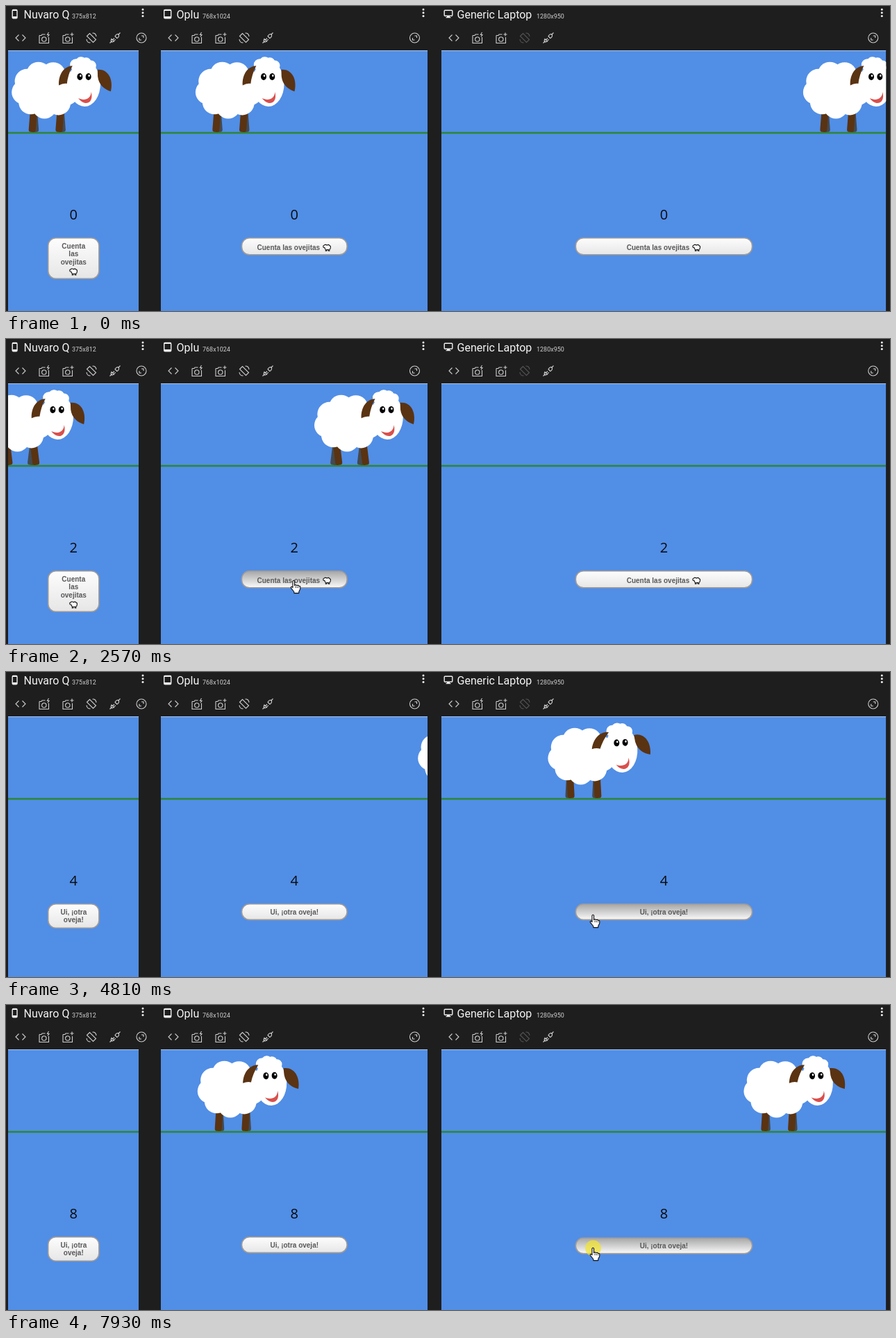
These frames come from a looping animation (1273x440 px, 8000 ms). An HTML page with a canvas:

```html
<!DOCTYPE html>
<html lang="es">
<head>
<meta charset="utf-8">
<title>Cuenta las ovejitas</title>
<style>
html, body { margin: 0; width: 100%; height: 100%; overflow: hidden; background: #1e1e1e; }
canvas { display: block; width: 1273px; height: 440px; }
</style>
</head>
<body>
<canvas id="stage"></canvas>
<script>
const W = 1273, H = 440, LOOP = 8000, TAU = Math.PI * 2;
const canvas = document.getElementById('stage');
const dpr = window.devicePixelRatio || 1;
canvas.width = W * dpr;
canvas.height = H * dpr;
const c = canvas.getContext('2d');

// speed in px/s; each walk lasts period ms and has run for lead ms at the start
const panels = [
  { x: 3, w: 188, name: 'Nuvaro Q', size: '375x812', sizeX: 95, icon: 'phone', narrow: true,
    speed: 103.5, period: 2947, lead: 515 },
  { x: 223, w: 384, name: 'Oplu', size: '768x1024', sizeX: 283, icon: 'tablet',
    speed: 66.6, period: 7886, lead: 1471 },
  { x: 627, w: 640.3, name: 'Generic Laptop', size: '1280x950', sizeX: 764, icon: 'screen', locked: true,
    speed: 90.4, period: 8875, lead: 6294 }
];
const ENTRY = -48, STEPS = 1.764;

const HOLD = 160;
const clicks = [1800, 2330, 3880, 4470, 5190, 5820, 6730, 7540, 7840];

function ease(t, from, to) {
  const u = Math.min(1, Math.max(0, (t - from) / (to - from)));
  return u * u * (3 - 2 * u);
}

function pointerAt(t) {
  const enter = ease(t, 300, 1500), cross = ease(t, 2630, 3720);
  return [470 - 56 * enter + 431 * cross, 442 - 94 * enter + 2 * cross + 3 * Math.sin(Math.PI * cross)];
}

function disc(x, y, rx, ry = rx) {
  c.beginPath();
  c.ellipse(x, y, rx, ry, 0, 0, TAU);
  c.fill();
}

function box(x, y, w, h, r) {
  c.beginPath();
  c.roundRect(x, y, w, h, r);
}

function text(str, x, y, font, color, align = 'left') {
  c.font = font;
  c.fillStyle = color;
  c.textAlign = align;
  c.fillText(str, x, y);
}

function path(d, fill, stroke, width = 1) {
  const p = new Path2D(d);
  if (fill) { c.fillStyle = fill; c.fill(p); }
  if (stroke) { c.strokeStyle = stroke; c.lineWidth = width; c.stroke(p); }
}

function at(x, y, draw, turn = 0) {
  c.save();
  c.translate(x, y);
  c.rotate(turn);
  draw();
  c.restore();
}

function legs(swing, color) {
  for (const x of [31.5, 70.2]) {
    at(x, 150, () => {
      c.fillStyle = color;
      box(-5, 0, 10, 32, [0, 0, 3.5, 3.5]);
      c.fill();
    }, -swing / 32);
  }
}

function head(tilt) {
  c.fillStyle = '#fff';
  disc(0, 27, 23, 33);
  for (let i = 0; i < 4; i++) disc(-12 + 7.3 * i, 1 - 5 * Math.sin((i + .3) * .95), 8.5 - .4 * i);
  for (const x of [-6.5, 5.8]) {
    c.fillStyle = '#000';
    disc(x, 17, 4, 5);
    c.fillStyle = '#fff';
    disc(x + 1, 15.5, 1.3, 1.6);
  }
  path('M-9 48C0 61 14 55 9.5 39C9 50 -1 52 -9 48Z', '#d9504c');
  at(-17, 1, () => path('M0 0C-12 1 -20 13 -18.5 29Q-13 25.5 -7 26Q-6 13 0 0Z', '#5a3312'), tilt * .3);
  at(19, 7, () => path('M0 0C14 -1 23 13 18 32C9 29 1 22 0 10Z', '#5a3312'), -tilt * .15);
}

function sheep(x, t) {
  const swing = 7.8 * Math.cos((t / 1000 * STEPS + .3) * TAU);
  const tilt = Math.sin(Math.PI * (t - 1200) / 9200) ** 2;
  at(x, 0, () => {
    legs(-swing, '#444a50');
    legs(swing, '#5a3312');
    c.fillStyle = '#fff';
    disc(48, 121, 38, 32);
    for (let i = 0; i < 9; i++) {
      const a = 3 + i * TAU / 9;
      disc(48 + 31 * Math.cos(a), 121 + 24 * Math.sin(a), 17.5);
    }
    at(104.3, 85, () => head(tilt), -.06 * tilt);
  });
}

function deviceIcon(kind, x) {
  c.strokeStyle = c.fillStyle = '#f0f0f0';
  c.lineWidth = 1.4;
  if (kind === 'screen') {
    box(x + 4.2, 6.2, 11.6, 8, 1); c.stroke();
    c.fillRect(x + 8, 14.5, 4, 1.6);
    c.fillRect(x + 6.5, 16, 7, 1.2);
    return;
  }
  const [dx, w] = kind === 'phone' ? [6.2, 6.8] : [4.7, 10];
  box(x + dx, 5.5, w, 12.3, 1.4); c.stroke();
  c.fillRect(x + dx, 5, w, 2);
  c.fillRect(x + dx, 15, w, 3);
}

const camera = 'M-7 -3.5H-4L-3 -5H1.5M6.5 -1V7.5H-7V-3.5M3 2A3.2 3.2 0 1 1 -3.4 2A3.2 3.2 0 1 1 3 2';
const icons = [
  'M-2.5 -4.5L-7 0L-2.5 4.5M2.5 -4.5L7 0L2.5 4.5',
  camera + 'M6.5 -8L4.5 -4.5H7L5 -1.5',
  camera + 'M6 -7.5V-2.5M3.5 -5H8.5',
  'M-6.5 -2.5L-2.5 -6.5L6.5 2.5L2.5 6.5ZM1.5 -7Q6.5 -7 7 -2M-1.5 7Q-6.5 7 -7 2',
  'M-7.5 7.5L-4.5 4.5M4.5 -4.5L7.5 -7.5M-5 1.5L-1.5 5L-4 6Q-7 5 -5 1.5ZM0 -2.5L2.8 .5Q6 -1 5.5 -4.5Q3 -7 0 -2.5ZM-3.5 3L-1 .5M-1.8 4.8L.8 2'
];
const ring = 'M7 0A7 7 0 1 1 -7 0A7 7 0 1 1 7 0M0 -3H3V0M0 3H-3V0';

function header(p) {
  const ink = '#cfcfcf', right = p.x + p.w;
  deviceIcon(p.icon, p.x);
  text(p.name, p.x + 22.5, 18, '16px Roboto, sans-serif', '#f4f4f4');
  text(p.size, p.sizeX, 17.7, '9px Roboto, sans-serif', '#d0d0d0');
  c.fillStyle = '#f0f0f0';
  const menu = p.narrow ? right + 6 : right - 6;
  for (let i = 0; i < 3; i++) disc(menu, 5 + i * 4.8, 1.5);
  icons.forEach((d, i) => {
    at(p.x + 18 + i * 34, 46, () => path(d, null, p.locked && i === 3 ? '#555' : ink, 1.1));
  });
  at(Math.max(right - 18.5, p.x + 192), 46, () => path(ring, null, ink, 1.1));
}

function miniSheep(x, y) {
  at(x, y, () => path('M-5.5 -2.5L-3 -4.2Q-1 -4.5 0 -3.5Q2 -5 3.5 -3.2Q5.7 -2.5 5 0Q5.2 2 3.5 2.5V4.7H2V3H-.5V4.7H-2V2.5Q-3.5 1.5 -3.3 0L-5.3 -.5Z',
    '#fff', '#111', 1.1));
}

function button(p, mid, asked, hover, down) {
  const w = p.w * .4 - 2;
  const h = p.narrow ? (asked ? 58.5 : 34.4) : (asked ? 24 : 22.6);
  const y = 334.8 + (down ? 1.2 : 0);
  const grad = c.createLinearGradient(0, y, 0, y + h);
  grad.addColorStop(0, hover ? '#a6a6a6' : '#fdfdfd');
  grad.addColorStop(1, hover ? '#fbfbfb' : '#e6e6e6');
  box(mid - w / 2, y, w, h, 11);
  c.fillStyle = grad;
  c.fill();
  c.strokeStyle = '#a09b97';
  c.lineWidth = 1.6;
  c.stroke();

  const label = (s, x, ly) => text(s, x, ly, 'bold 10px "Liberation Sans", Arial, sans-serif', '#585858', 'center');
  if (p.narrow) {
    const lines = asked ? ['Cuenta', 'las', 'ovejitas'] : ['Ui, ¡otra', 'oveja!'];
    lines.forEach((s, i) => label(s, mid, y + 15 + i * 11.6));
    if (asked) miniSheep(mid, 383.3);
  } else if (asked) {
    label('Cuenta las ovejitas', mid - 8.5, y + 16.8);
    miniSheep(mid + 47, y + 13.8);
  } else {
    label('Ui, ¡otra oveja!', mid, y + 15);
  }
}

function panel(p, t, count, [px, py], down) {
  const mid = p.x + p.w / 2 + .3;
  header(p);

  c.save();
  c.beginPath();
  c.rect(p.x, 64, p.w, H - 64);
  c.clip();
  c.fillStyle = '#518ee6';
  c.fillRect(p.x, 64, p.w, H);
  c.fillStyle = '#2e8639';
  c.fillRect(p.x, 181.7, p.w, 2.6);
  sheep(p.x + ENTRY + p.speed * ((t + p.lead) % p.period) / 1000, t);
  c.fillStyle = '#a9c6f0';
  c.fillRect(p.x, 64, p.w, 1);
  c.restore();

  text(count, mid, 308, '20px "Open Sans", "Noto Sans", sans-serif', '#0a0a0a', 'center');
  const hover = Math.abs(px - mid) < p.w * .2 - 1 && py > 334 && py < 360;
  button(p, mid, count < 3, hover, hover && down);
  return hover;
}

function drawCursor([x, y], hand, glow) {
  if (glow) {
    c.fillStyle = 'rgba(242, 228, 48, .74)';
    disc(x + .5, y + .8, 11.5);
  }
  c.lineJoin = 'round';
  at(x, y, () => {
    if (hand) {
      c.scale(1.04, 1.06);
      path('M-1 1.5Q0 -.8 1.5 1.2V7L3 6.2L4.5 7.2L6.3 6.8L7.6 8L9 8Q9.8 9 9.3 12L7.5 15.5V17.5H.8V15.8L-3.5 10.5Q-3.8 8.5 -2 9L-1 10Z', '#fff', '#111', 1.1);
      path('M3 8V10.5M5.2 8.5V10.5M7.3 9V10.5', null, '#111', .8);
    } else {
      path('M0 0V13.5L3.1 10.7L5.2 15.6L7.5 14.6L5.4 9.8H9.6Z', '#fff', '#111', 1);
    }
  });
  c.lineJoin = 'miter';
}

function draw(t) {
  const count = clicks.filter(k => t >= k + HOLD).length;
  const down = clicks.some(k => t >= k && t < k + HOLD);
  const glow = clicks.some(k => t >= k + 60 && t < k + HOLD);
  const cursor = pointerAt(t);
  c.setTransform(dpr, 0, 0, dpr, 0, 0);
  c.fillStyle = '#1e1e1e';
  c.fillRect(0, 0, W, H);
  const hand = panels.map(p => panel(p, t, count, cursor, down)).includes(true);
  drawCursor(cursor, hand, glow);
}

const start = performance.now();
function tick() {
  draw((performance.now() - start) % LOOP);
  requestAnimationFrame(tick);
}
tick();
</script>
</body>
</html>
```
